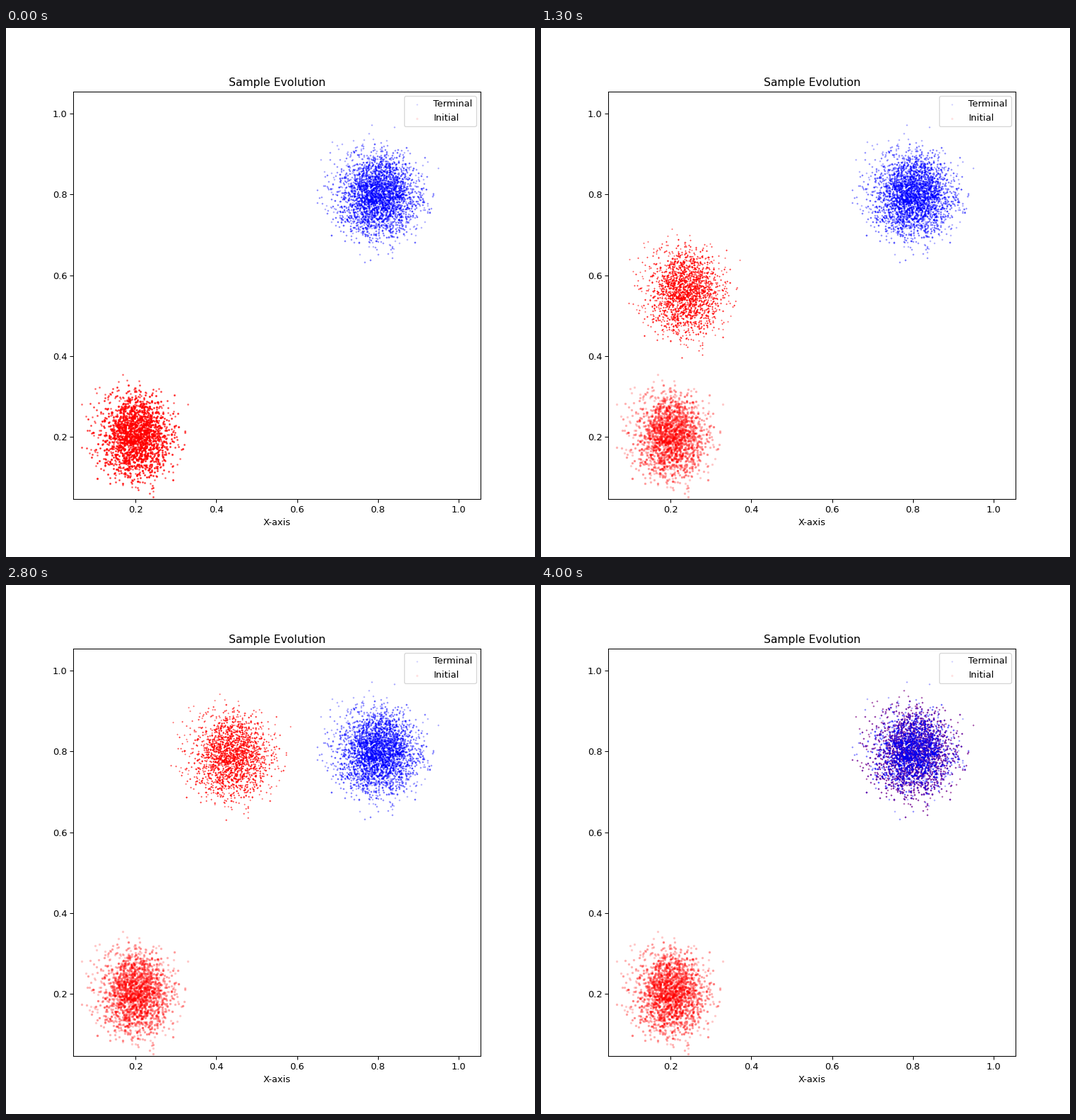
Animation of 748x748 px, one loop 4.1 s. Source, as a matplotlib script:

```python
import numpy as np
import matplotlib.pyplot as plt
from matplotlib.animation import FuncAnimation

DPI = 93.5
FRAMES = 41
LAST = FRAMES - 1
LIMITS = (0.0458, 1.0553)
START, END = 0.2, 0.8
SIGMA = np.array([0.045, 0.05])

rng = np.random.default_rng(12)

# Smooth path of the cloud centre: phase, x offset, y offset.
PATH = np.array([
    (0.0, 0.000, 0.000),
    (0.3, 0.031, 0.332),
    (0.6, 0.154, 0.556),
    (0.8, 0.341, 0.601),
    (1.0, 0.600, 0.596)])
DRIFT = np.polyfit(PATH[:, 0], PATH[:, 1:], 4)


def gaussian(count, reach=3.5):
    """Unit normal points inside a given radius."""
    pts = rng.normal(size=(2 * count, 2))
    return pts[np.hypot(*pts.T) < reach][:count]


def repeat_dense(pts, unit):
    """Repeat points so that the middle of a cloud is stronger than its rim."""
    density = np.exp(-np.sum(unit ** 2, axis=1) / 8)
    return np.repeat(pts, 2 + rng.poisson(2.5 * density), axis=0)


def flow(pts, u):
    """Carry points from the start cloud to phase u in [0, 1]."""
    dx, dy = (pts - START).T
    grow = min(u / 0.75, 1)
    scale_x = 1 + 0.11 * grow * grow * (3 - 2 * grow)
    scale_y = 1 + 0.025 * np.sin(np.pi * min(u / 0.6, 1))
    move_x, move_y = (np.polyval(c, u) for c in DRIFT.T)
    x = START + move_x + scale_x * dx + 0.09 * u ** 1.5 * dy
    y = START + move_y + scale_y * dy - 0.08 * u ** 2 * dx
    return np.column_stack([x, y])


def dots(pts, colour, width, alpha, zorder, label=None):
    """Scatter with the dot diameter given in pixels."""
    size = (width * 72 / DPI) ** 2
    return ax.scatter(pts[:, 0], pts[:, 1], s=size, c=colour, alpha=alpha,
                      linewidths=0, zorder=zorder, label=label)


unit = gaussian(1800)
samples = repeat_dense(START + SIGMA * unit, unit)
extra = gaussian(1000)
terminal = np.vstack([
    flow(samples, 1),
    repeat_dense(END + 0.05 * extra, extra)])

fig, ax = plt.subplots(figsize=(8, 8), dpi=DPI)
ax.set_aspect("equal")
ax.set_xlim(LIMITS)
ax.set_ylim(LIMITS)
ticks = np.arange(0.2, 1.1, 0.2)
ax.set_xticks(ticks)
ax.set_yticks(ticks)
ax.set_title("Sample Evolution")
ax.set_xlabel("X-axis")

dots(terminal, "blue", 2.1, 0.22, 1.2, "Terminal")
dots(samples, "red", 3.3, 0.11, 1.0, "Initial")
moving = dots(samples, "red", 1.8, 0.4, 1.1)
ax.legend(loc="upper right")


def update(frame):
    moving.set_offsets(flow(samples, frame / LAST))
    return (moving,)


anim = FuncAnimation(fig, update, frames=FRAMES, interval=100, repeat=True)
plt.show()
```
